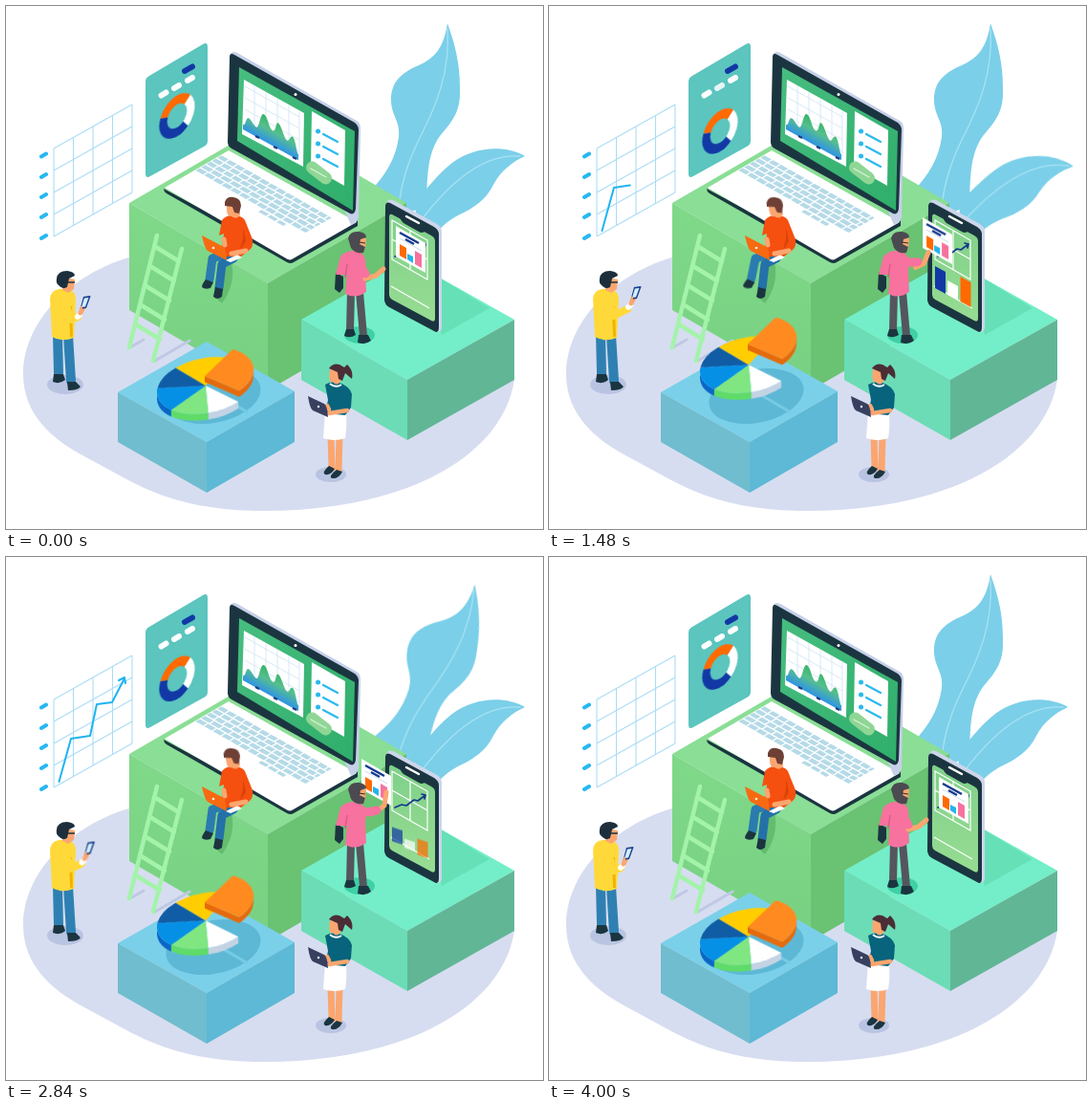
Animation of 562 by 547 pixels, one loop 4040 ms. Source, as an HTML page without scripts:

```html
<!DOCTYPE html>
<html lang="en">
<head>
<meta charset="utf-8">
<title>Isometric data scene</title>
<style>
html, body { margin: 0; width: 100%; height: 100%; overflow: hidden; background: #fff; }
svg { display: block; width: 100vw; height: 100vh; }
.ln { fill: none; stroke-linecap: round; stroke-linejoin: round; }
.flat { fill: none; }
.skin { fill: #fba670; }
.dark { fill: #1b3540; }

.a { animation: 4040ms cubic-bezier(.37, 0, .63, 1) infinite; }
.pie { animation-name: pie; }
.wedge { animation-name: wedge; }
.ring { animation-name: ring; }
.tall { animation-name: tall; transform-origin: 410px 205px; }
.low { animation-name: low; transform-origin: 430px 225px; }
.trend { animation-name: trend; stroke-dasharray: 100 120; }
.tip { animation-name: tip; }
.chart { animation-name: chart; }
.p1 { animation-name: p1; }
.p2 { animation-name: p2; }
.p3 { animation-name: p3; }
.p4 { animation-name: p4; }
.bars { animation-name: bars; }
.bars path { animation-name: grow; transform-box: fill-box; transform-origin: 50% 100%; }
.doc { animation-name: doc; }
.sleeve { animation-name: sleeve; }
.reach { animation-name: reach; }
.lift { animation-name: lift; }
.elbow { animation-name: elbow; }
.leg { animation-name: leg; transform-origin: 216px 264px; }
.nod { animation-name: nod; transform-origin: 238px 219px; }
.wave { animation-name: wave; }
.row { animation-name: row; stroke-dasharray: 20 40; }

@keyframes pie { 50% { transform: translateY(-26px); } }
@keyframes wedge { 50% { transform: translateY(-40px); } }
@keyframes ring { 50% { transform: translateY(19px); } }
@keyframes tall { 0%, 49.5%, 99%, 100% { transform: none; } 74.25% { transform: rotate(9.6deg); } }
@keyframes low { 0%, 49.5%, 100% { transform: none; } 24.75% { transform: rotate(10deg); } }
@keyframes trend {
  0%, 24.75% { stroke-dashoffset: 101; animation-timing-function: linear; }
  51.5%, 100% { stroke-dashoffset: 0; }
}
@keyframes tip { 0%, 51% { opacity: 0; } 53%, 100% { opacity: 1; } }
@keyframes chart { 0%, 24.7% { opacity: 0; } 24.8%, 86% { opacity: 1; } 96%, 100% { opacity: 0; } }
@keyframes p1 { 0%, 5%, 25%, 100% { opacity: 1; } 15% { opacity: .45; } }
@keyframes p2 { 0%, 20%, 41%, 100% { opacity: 1; } 29% { opacity: .45; } }
@keyframes p3 { 0%, 49.5%, 70%, 100% { opacity: 1; } 60% { opacity: .45; } }
@keyframes p4 { 0%, 72%, 92%, 100% { opacity: 1; } 82% { opacity: .4; } }
@keyframes bars { 0%, 12% { opacity: 0; } 22%, 66% { opacity: 1; } 78%, 100% { opacity: 0; } }
@keyframes grow { 0%, 11% { transform: scaleY(.15); } 25%, 64% { transform: none; } 78%, 100% { transform: scaleY(.15); } }
@keyframes doc { 0%, 24.75%, 99%, 100% { transform: none; } 49.5%, 76% { transform: translate(-36px, -19px); } }
@keyframes sleeve {
  0%, 15%, 99%, 100% { d: path("M367 264L372 274L376 280"); }
  45%, 78% { d: path("M367 264L379 267L388 265"); }
}
@keyframes reach {
  0%, 10%, 99%, 100% { d: path("M376 285L387 282L395 275"); }
  27% { d: path("M377 284L388 281L396 272"); }
  45%, 78% { d: path("M389 265L396 260L398 246"); }
}
@keyframes lift { 0%, 81%, 100% { transform: none; } 17%, 61% { transform: translate(8px, -10px); } }
@keyframes elbow {
  0%, 81%, 100% { d: path("M61 308L68 328L75 325"); }
  17%, 61% { d: path("M61 308L68 324L82 317"); }
}
@keyframes leg { 0%, 49.5%, 100% { transform: none; } 24.75% { transform: rotate(7deg); } }
@keyframes nod { 0%, 28%, 57%, 98%, 100% { transform: none; } 43%, 80% { transform: rotate(-9deg); } }
@keyframes wave {
  0%, 49.5%, 72%, 100% { d: path("M0 -3C3 -3 3 -13 6 -13S11 -8 14 -8S18 -26 22 -26S27 -14 31 -14S34 -25 37 -25S43 -12 46 -12S49 -19 52 -19S56 -4 58 -4V2H0Z"); }
  60% { d: path("M0 -3C3 -3 3 -16 6 -16S11 -5 14 -5S18 -29 22 -29S27 -9 31 -9S34 -21 37 -21S43 -14 46 -14S49 -15 52 -15S56 -4 58 -4V2H0Z"); }
}
@keyframes row { 0%, 6%, 25%, 36%, 55%, 100% { stroke-dashoffset: 0; } 15%, 45% { stroke-dashoffset: 12; } }
</style>
</head>
<body>
<svg viewBox="0 0 562 547" preserveAspectRatio="none">
<defs>
  <linearGradient id="side" x2="0" y2="1"><stop stop-color="#80d889"/><stop offset="1" stop-color="#78d182"/></linearGradient>
  <linearGradient id="area" x2="0" y2="1"><stop stop-color="#37b567"/><stop offset=".45" stop-color="#56bf8e"/><stop offset="1" stop-color="#2f93e6"/></linearGradient>
  <linearGradient id="view" x2="1" y2="1"><stop stop-color="#47bd7f"/><stop offset="1" stop-color="#2fae6b"/></linearGradient>
  <linearGradient id="glass" x2="0" y2="1"><stop stop-color="#7fd08a"/><stop offset="1" stop-color="#97dc92"/></linearGradient>
</defs>

<path fill="#d7ddf0" d="M135 261C65 280 18 332 18 385C18 427 48 453 82 471L130 497C172 519 215 528 270 528C420 528 520 470 532 391L400 250Z"/>

<!-- leaves -->
<g class="a tall">
  <path fill="#7bcfe9" d="M462 18C458 44 449 54 432 62C413 70 403 80 403 98C403 115 413 120 411 137C408 160 397 176 383 192L410 222L440 208C441 176 441 155 454 136C470 118 476 108 475 85C475 60 470 40 462 18Z"/>
  <path class="ln" stroke="#a8e2f3" stroke-width="1.3" d="M462 24C465 70 450 105 432 140C421 163 414 183 411 210"/>
</g>
<g class="a low">
  <path fill="#7bcfe9" d="M543 157C522 145 490 147 467 164C453 175 442 189 428 205L430 236H452C458 228 466 223 473 219C490 211 502 203 510 187C518 172 530 163 543 157Z"/>
  <path class="ln" stroke="#a8e2f3" stroke-width="1.3" d="M538 157C500 154 466 183 436 222"/>
</g>

<!-- wall grid and trend -->
<path class="flat" stroke="#abdcf6" stroke-width="1.1" d="M50 149l82-46M50 172l82-46M50 195l82-46M50 218l82-46M50 241l82-46M50 149v92M70.5 137.5v92M91 126v92M111.5 114.5v92M132 103v92"/>
<path class="ln" stroke="#27b8f3" stroke-width="4" d="M37 157.500l5-3M37 179l5-3M37 200l5-3M37 221l5-3M37 243l5-3"/>
<g class="a chart ln" stroke="#1fb4f0" stroke-width="2">
  <path class="a trend" pathLength="100" d="M55.500 235L68 190L88 187L95 154L111 152L124 127"/>
  <path class="a tip" d="M118 129L124 126L125 132"/>
</g>

<!-- teal panel -->
<path fill="#5bc5be" d="M146 79Q146 75 150 73L206 40Q211 37 211 43V141Q211 145 207 147L151 178Q146 181 146 175Z"/>
<g class="ln" stroke="#fff" stroke-width="6">
  <path class="a p1" d="M162.500 93.500l5-3"/>
  <path class="a p2" d="M176 86l5-3"/>
  <path class="a p3" d="M190 78l5-3"/>
  <path class="a p4" stroke="#1238a5" d="M187 68l8-4.500"/>
</g>
<g class="a ring"><g transform="matrix(.866 -.5 0 1 179 115)">
  <g class="flat" stroke-width="9.500" transform="rotate(200)">
    <circle r="16.700" stroke="#ff6a00" pathLength="360" stroke-dasharray="119 241"/>
    <circle r="16.700" stroke="#fff" pathLength="360" stroke-dasharray="93 267" stroke-dashoffset="-119"/>
    <circle r="16.700" stroke="#1238a5" pathLength="360" stroke-dasharray="148 212" stroke-dashoffset="-212"/>
  </g>
</g></g>

<!-- green block -->
<path fill="#8ade95" d="M129 206L274 122L419 206L274 290Z"/>
<path fill="url(#side)" d="M129 206L274 290V402L129 318Z"/>
<path fill="#6ac273" d="M274 290L419 206V318L274 402Z"/>

<!-- laptop -->
<path class="dark" d="M165 191L298 263L368 224V230L301 268Q298 270 294 268L168 196Q165 194 165 191Z"/>
<path fill="#fff" d="M166 190L233 151L367 226L299 265Q297 266 294 264.500Z"/>
<path fill="#c6d0e8" d="M234 52Q236 46 242 49L367 120Q371 122 371 128L369 221Q368 227 361 229L355 215Z"/>
<path class="dark" d="M234 54Q234 48 239 51L365 122Q369 125 369 130L366 212Q365 219 360 217L236 149Q232 147 232 142Z"/>
<path fill="url(#view)" d="M244 64L365 131L363 214L242 141Z"/>
<circle cx="303" cy="92.500" r="1.500" fill="#fff"/>
<path fill="#fff" d="M249 77L312 112L311 168L247 134Z"/>
<path class="flat" stroke="#cfe4f5" stroke-width=".8" d="M250 84l57 32M250 96l57 32M250 108l57 32M250 120l57 32M260 83v48M272 90v48M284 97v48M296 103v48M307 110v48"/>
<g transform="matrix(1 .555 0 1 248 127)"><path class="a wave" fill="url(#area)" d="M0 -3C3 -3 3 -13 6 -13S11 -8 14 -8S18 -26 22 -26S27 -14 31 -14S34 -25 37 -25S43 -12 46 -12S49 -19 52 -19S56 -4 58 -4V2H0Z"/></g>
<path class="flat" stroke="#1d3d78" stroke-width="2" d="M261 136l4 2M280 147l4 2M300 158l4 2"/>
<path fill="#fff" d="M320 110L355 130L354 188L319 168Z"/>
<g class="ln" stroke="#2bb9ef" stroke-width="2.200">
  <path stroke-width="5" d="M326.500 131h.1M326.500 144h.1M326.500 157h.1"/>
  <path d="M332 134l15 8M332 160l15 8"/>
  <path class="a row" d="M332 147l15 8"/>
</g>
<path class="ln" stroke="#8fd695" stroke-width="13" d="M320.500 169l14 11"/>
<path class="ln" stroke="#d8f3da" stroke-width="1.200" d="M319 170l16 9"/>
<g transform="matrix(.866 .49 -.866 .5 226 156)" class="flat" stroke="#b5dae7" stroke-width="5">
  <path stroke-dasharray="8.500 1.500" d="M0 3h133"/>
  <path stroke-dasharray="9 1.500" d="M0 9.600h133"/>
  <path stroke-dasharray="8.500 1.500" d="M0 16.200h133"/>
  <path stroke-dasharray="10 1.500" d="M0 22.800h133"/>
  <path stroke-dasharray="9 1.500" d="M0 29.400h133"/>
  <path stroke-width="4" stroke-dasharray="9 2" d="M82 36h30"/>
</g>

<!-- ladder -->
<path class="ln" stroke="#bfc8e3" stroke-width="3" d="M156 371l36-21M130 357l14-8"/>
<path class="ln" stroke="#a3f3aa" stroke-width="4.500" d="M158 240L129 357M184 254L154 371M155 251l26 16M150 271.500l26 16M145 292l26 16M140 312l26 16M135 332.500l26 16"/>

<!-- seated man -->
<path fill="#5cb567" opacity=".75" d="M228 262L236 268C240 284 234 300 226 311L219 305Z"/>
<g class="a leg">
  <path class="ln" stroke="#2a7bb0" stroke-width="9" d="M232 259L216 264L213 286"/>
  <path class="dark" d="M209 286l8 3-3 6q-6 2-9-1 0-3 4-8z"/>
</g>
<path class="ln" stroke="#2371a8" stroke-width="9" d="M238 264L226 270L223 295"/>
<path class="dark" d="M219 294l8 2-1 8q-5 4-9 0z"/>
<path fill="#f5500f" d="M226 224Q230 219 237 219Q247 219 250 224L258 244Q259 252 255 255L246 262L225 262L228 238L223 240Z"/>
<path fill="#d9430a" d="M248 232l3 14-6 9 3-12z"/>
<path fill="#fff" d="M230 266l12-6 5 3-12 5z"/>
<path class="ln" stroke="#fba670" stroke-width="5" d="M251 256l-15 3M228 244l1 6"/>
<path fill="#f76a12" d="M205 240L228 252Q230 253 231 266L211 256Q208 254 205 240Z"/>
<circle cx="217" cy="253" r="1.300" fill="#fff"/>
<g class="a nod">
  <path class="skin" d="M231 208l13 1 1 10q-4 5-9 1-6 1-5-12z"/>
  <path fill="#6e3f35" d="M229 205q2-6 9-5 8 1 8 9l-2 8-5-1-2-6-8-1z"/>
</g>

<!-- teal block -->
<path fill="#74eec8" d="M309 328L420 265L532 328L420 391Z"/>
<path fill="#6cdcb6" d="M309 328L420 391V454L309 391Z"/>
<path fill="#61b696" d="M420 391L532 328V391L420 454Z"/>
<path fill="#66e0b7" d="M440 276L506 316L456 344Z"/>

<!-- phone -->
<path fill="#cdd6eb" d="M398 207Q399 201 405 203L451 228Q456 231 456 236V336Q456 341 451 341L430 320Z"/>
<path class="dark" d="M397 210Q397 204 402 206L448 231Q453 234 453 239V336Q453 343 448 340L401 315Q396 312 396 307Z"/>
<path fill="url(#glass)" d="M404 218Q401 217 401 221V302Q401 305 404 307L445 329Q449 331 449 327V246Q449 242 445 240Z"/>
<path class="dark" d="M412 217l26 15v4q-3 2-6 0l-16-9q-4-3-4-10z"/>
<path class="ln" stroke="#fff" stroke-width="2.500" d="M419 220l13 7"/>
<path class="flat" stroke="#fff" stroke-width="1.200" d="M404 224l37 21v41l-37-21zM404 244l37 21M423 235v41M403 293l40 23"/>
<path class="ln" stroke="#153a8c" stroke-width="1.700" d="M407 262l7-3 5 1 8-6 4 1 8-6m-4-1l4 1-1 4"/>
<g class="a bars">
  <path class="a" fill="#1238a5" d="M404 272l11 6v23l-11-6z"/>
  <path class="a" fill="#fff" d="M417 287l11 6v15l-11-6z"/>
  <path class="a" fill="#ff6a00" d="M430.500 283l11 6v26l-11-6z"/>
</g>
<g class="a doc">
  <path fill="#fff" d="M408 230l31 18v31l-31-17z"/>
  <path class="flat" stroke="#153a8c" stroke-width="2.400" d="M412 237l20 11M418 244l9 5"/>
  <path class="flat" stroke="#c9dcec" d="M412 243l23 13"/>
  <path fill="#ff6a00" d="M412 249l7 4v12l-7-4z"/>
  <path fill="#22b5ea" d="M420 259l6 3v7l-6-4z"/>
  <path fill="#f7729e" d="M428 256l7 4v14l-7-4z"/>
</g>

<!-- man in pink -->
<ellipse cx="370" cy="344" rx="16" ry="9" fill="#3fd0a5"/>
<path class="dark" d="M345 279l8 4v12l-4 5-5-4z"/>
<path class="ln" stroke="#55555e" stroke-width="8" d="M361 299L360 340M370 299L374 345"/>
<path class="dark" d="M356 338h8l2 6q-6 4-12 1zM369 344h10l3 6q-6 5-14 2z"/>
<path fill="#f7729e" d="M350 262Q355 256 363 256L373 259Q378 264 376 278L377 299Q366 307 355 301L357 281L345 281Z"/>
<path class="flat" stroke="#df5a89" stroke-width="1.500" d="M357 270l-2 14"/>
<path class="skin" d="M368 241l9 2-1 11-5 5-6-3z"/>
<path fill="#4b4a50" d="M358 243q2-8 11-7 8 1 8 6l-6 2-1 5 6 3-2 6q-8 2-13-5z"/>
<path class="flat" stroke="#2b2b30" d="M369 247l7 1"/>
<path class="a reach ln" stroke="#fba670" stroke-width="5" d="M376 285L387 282L395 275"/>
<path class="a sleeve ln" stroke="#f7729e" stroke-width="9" d="M367 264L372 274L376 280"/>

<!-- blue block and pie -->
<path fill="#7ad0e9" d="M117 404L210 351L302 403L210 456Z"/>
<path fill="#70bdcf" d="M117 404L210 456V509L117 456Z"/>
<path fill="#5db9d5" d="M210 456L302 403V456L210 509Z"/>
<circle r="49.500" fill="#5db8d6" transform="matrix(1 -.14 0 .57 217 408)"/>
<path stroke="#75cbe5" stroke-width="3" d="M217 404l36 21"/>
<g class="a pie"><g transform="matrix(1 -.137 0 .57 209 397)">
  <path fill="#c4d3e4" d="M34.100 37.900A51 51 0 0 1 2.700 50.900V63A51 51 0 0 0 34.100 50Z"/>
  <path fill="#5fdb68" d="M2.700 50.900A51 51 0 0 1-36.100 36.100v12A51 51 0 0 0 2.700 63Z"/>
  <path fill="#0a66c6" d="M-36.100 36.100A51 51 0 0 1-50.500-7.100v12A51 51 0 0 0-36.100 48.100Z"/>
  <path fill="#fff" d="M0 0L34.100 37.900A51 51 0 0 1 2.700 50.900Z"/>
  <path fill="#80e682" d="M0 0L2.700 50.900A51 51 0 0 1-36.100 36.100Z"/>
  <path fill="#0590e6" d="M0 0L-36.100 36.100A51 51 0 0 1-50.500-7.100Z"/>
  <path fill="#105da6" d="M0 0L-50.500-7.100A51 51 0 0 1-31.400-40.200Z"/>
  <path fill="#ffcd00" d="M0 0L-31.400-40.200A51 51 0 0 1 25.500-44.200Z"/>
</g></g>
<g class="a wedge"><g transform="matrix(1 -.137 0 .57 208 387)">
  <path fill="#e56a0c" d="M0 0L36.100 36.100A51 51 0 0 0 51 0v11A51 51 0 0 1 36.100 47L0 11Z"/>
  <path fill="#ff8a1f" d="M0 0L29.300-41.800A51 51 0 0 1 36.100 36.100Z"/>
</g></g>

<!-- man in yellow -->
<ellipse cx="62" cy="396" rx="19" ry="10" fill="#b9c4e2"/>
<path class="ln" stroke="#2f80b2" stroke-width="10" d="M54 344L55 384M65 344L68 392"/>
<path class="dark" d="M50 385h10l2 6q-6 5-13 2zM64 393h9l5 5q-2 4-13 4z"/>
<path fill="#ffd93a" d="M46 306Q47 297 56 296L66 296Q73 299 73 308L71 347Q58 352 48 346Z"/>
<path class="flat" stroke="#f0b400" stroke-width="3" d="M67.500 314l1 32"/>
<path class="skin" d="M61 284l11 2-1 10-6 4-6-3z"/>
<path fill="#1d2f3c" d="M53 285q1-8 11-8 8 1 8 5l-6 3-2 9q-5 3-9-2-3-2-2-7z"/>
<path class="flat" stroke="#1d2f3c" stroke-width="1.500" d="M63 289h9"/>
<path class="a elbow ln" stroke="#ffd93a" stroke-width="8" d="M61 308L68 328L75 325"/>
<g class="a lift">
  <path class="ln" stroke="#fff" stroke-width="6" d="M75 325l2-2"/>
  <path class="ln" stroke="#fba670" stroke-width="5" d="M78 321l3-6"/>
  <path fill="#17428f" d="M81 304l7-1q1 1 0 2l-4 11-6 1q-1-1 0-2z"/>
  <path fill="#d4eefb" d="M82 305.500l4.500-.5-3.500 9.500-4 .5z"/>
  <path class="ln" stroke="#fba670" stroke-width="2.500" d="M78 318l1-3"/>
</g>

<!-- woman -->
<ellipse cx="340" cy="490" rx="16" ry="8" fill="#b9c4e2"/>
<path class="ln" stroke="#fba670" stroke-width="7" d="M340 450L341 483M349 450L348 486"/>
<path class="dark" d="M338 481l6 3q-4 7-10 6-4-2 4-9zM346 485l6 2q-4 8-11 7-4-2 5-9z"/>
<path fill="#fff" d="M334 424L356 426Q357 440 355 452Q344 456 332 452Z"/>
<path fill="#07647c" d="M334 396Q340 392 349 394Q360 398 362 406L361 420L355 428L334 426L337 412Z"/>
<path class="flat" stroke="#fff" stroke-width="2" d="M339 395q6 5 12 1"/>
<path class="skin" d="M339 380l12 2-1 11q-4 5-8 0-5 2-3-13z"/>
<path fill="#4b2d35" d="M338 379q4-6 11-4l5 3 3-3q7 6 5 15l-7-6-3 8-4-2-1-7z"/>
<path class="ln" stroke="#fba670" stroke-width="4.500" d="M357 423l-19 3M336 418l2 4"/>
<path fill="#37405f" d="M316 408L333 416Q336 417 337 430L321 423Q318 421 316 408Z"/>
<circle cx="327" cy="419" r="1.200" fill="#fff"/>
</svg>
</body>
</html>
```
